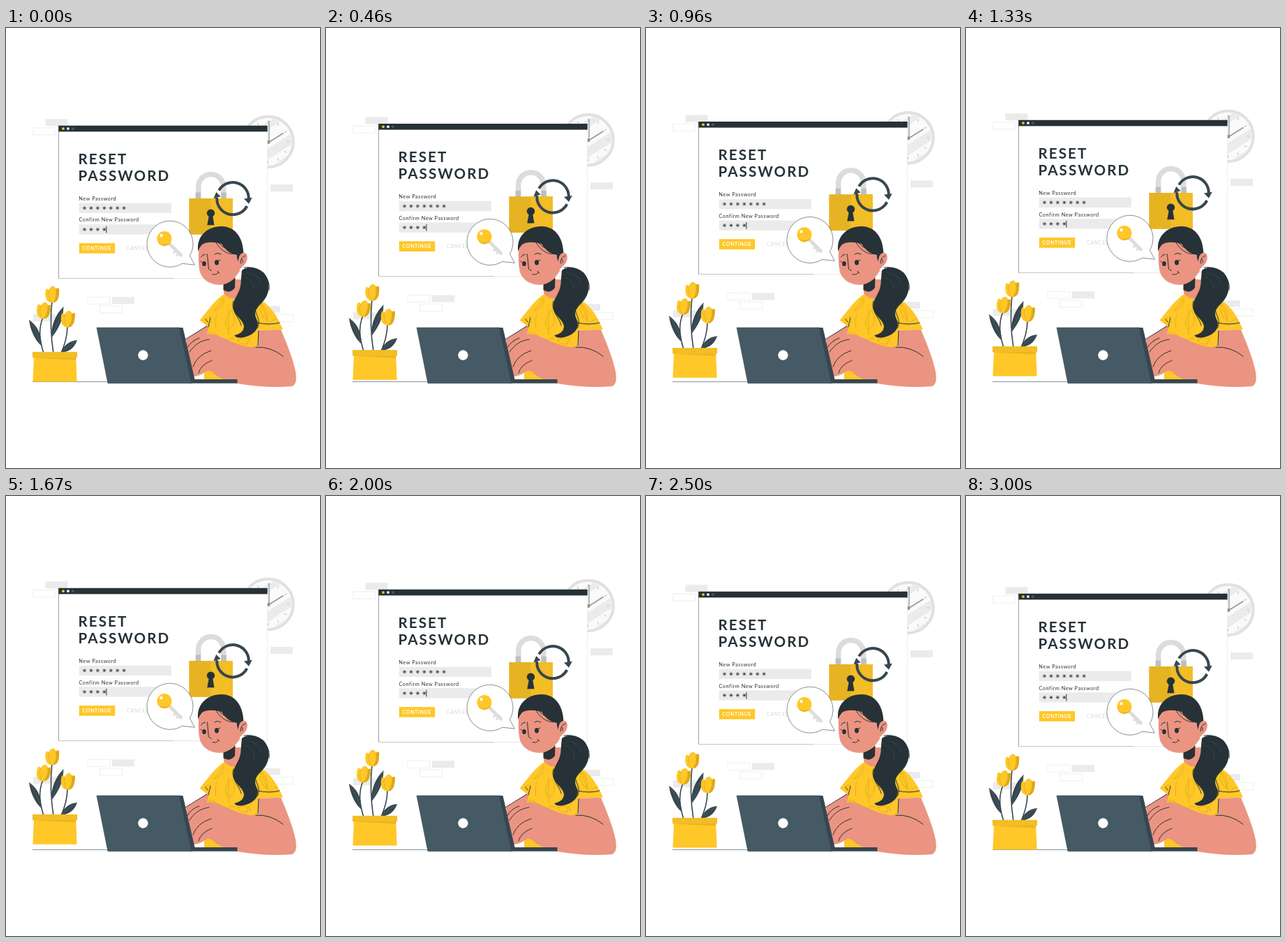
Animation, 450 px wide and 630 px high, one loop 3040 ms. Source, as an HTML page:

```html
<!DOCTYPE html>
<html lang="en">
<head>
<meta charset="utf-8">
<title>Reset password</title>
<style>
html, body { margin: 0; width: 100%; height: 100%; overflow: hidden; background: #fff; }
svg { display: block; width: 450px; height: 630px; }
text { font-family: Lato, "Open Sans", sans-serif; fill: #263238; }
.title { font-size: 20.6px; font-weight: 700; letter-spacing: 2.05px; }
.label { font-size: 7.3px; letter-spacing: .55px; }
.button { font-size: 6.8px; font-weight: 700; letter-spacing: .8px; }
.box { fill: #ebebeb; }
.frame { fill: #fff; stroke: #ebebeb; stroke-width: .8; }
.line { fill: none; stroke: #263238; stroke-width: 1; stroke-linecap: round; stroke-linejoin: round; }
.dark { fill: #263238; }
.slate { fill: #37474f; }
.skin { fill: #eb9481; }
.gold { fill: #ffc727; }
.amber { fill: #e6b323; }
.stem { fill: none; stroke: #37474f; stroke-width: 1.6; }
.print { fill: none; stroke: #d9a61c; stroke-width: .7; }
</style>
</head>
<body>
<svg viewBox="0 0 450 630">
  <defs>
    <path id="star" d="M-2.6 0H2.6M-1.3-2.3 1.3 2.3M1.3-2.3-1.3 2.3" stroke="#263238" stroke-width=".85"/>
    <g id="tulip">
      <path class="gold" d="M-9-7Q-7-9-5-6Q-3-11 1-12Q4-10 5-8Q9-11 10-7C10 4 9 12 0 12C-10 12-11 0-9-7Z"/>
      <path fill="#dda91d" d="M1-12Q5-10 5-7Q10-11 10-6C10 5 8 11 1 12Q7 4 5-6Q4-10 1-12Z"/>
      <path class="print" d="M-5-6Q-7 2-2 10"/>
    </g>
    <clipPath id="face"><circle cx="375.6" cy="163" r="34"/></clipPath>
  </defs>

  <g class="float">
    <rect class="box" x="56.5" y="130.3" width="32" height="10"/>
    <rect class="frame" x="38.5" y="142.9" width="32" height="10"/>
    <rect class="box" x="379" y="224" width="32" height="10"/>
    <rect class="frame" x="117" y="385.2" width="32" height="10"/>
    <rect class="box" x="152" y="385.2" width="32" height="10"/>
    <rect class="frame" x="134.5" y="398" width="32" height="10"/>
    <rect class="box" x="361" y="398" width="32" height="9.5"/>
    <rect class="frame" x="379" y="410.5" width="32" height="10"/>
    <rect class="box" x="39" y="410" width="32" height="10"/>

    <circle cx="375.6" cy="163" r="36.2" fill="#fafafa" stroke="#e0e0e0" stroke-width="4"/>
    <g clip-path="url(#face)" fill="none" stroke="#ebebeb">
      <path d="M336 164 404 122" stroke-width="9"/>
      <path d="M350 197 418 153" stroke-width="13"/>
      <path d="M372 206 420 175" stroke-width="5"/>
    </g>
    <g id="ticks" stroke="#bdbdbd" stroke-width="1"></g>
    <path d="M377 164V133" stroke="#a6a6a6" stroke-width="1.6"/>
    <path d="M376 164 397.5 150.5" stroke="#9b9b9b" stroke-width="1.8"/>
    <circle cx="376" cy="163.5" r="2.5" fill="#919191"/>

    <rect x="75.5" y="140.2" width="299" height="218.1" fill="#fff" stroke="#9a9fa2" stroke-width=".6"/>
    <path d="M374.5 149V358.3H240" fill="none" stroke="#fff" stroke-opacity=".7"/>
    <path d="M75.5 148V358" stroke="#737b80" stroke-width=".5"/>
    <rect class="dark" x="75.2" y="139.8" width="299.4" height="8.6"/>
    <circle class="gold" cx="82" cy="144.1" r="1.9"/>
    <circle cx="89" cy="144.1" r="1.9" fill="#fff"/>
    <circle cx="96" cy="144.1" r="1.9" fill="#455a64"/>

    <text class="title" x="103.5" y="195.2">RESET</text>
    <text class="title" x="103.5" y="219.2">PASSWORD</text>
    <text class="label" x="104.3" y="246.9">New Password</text>
    <rect class="box" x="104.7" y="250.6" width="132.3" height="14.4"/>
    <text class="label" x="104.5" y="277.5">Confirm New Password</text>
    <rect class="box" x="104.7" y="281.2" width="132.3" height="14.4"/>
    <g id="stars"></g>
    <path class="line" d="M143.9 284.2V293" stroke-width=".8"/>
    <rect class="gold" x="104.8" y="308.1" width="51.4" height="14.6"/>
    <text class="button" x="109.5" y="318.1" style="fill:#fff">CONTINUE</text>
    <text class="button" x="173" y="318.1" style="fill:#e0e0e0">CANCEL</text>

    <path d="M275.7 245V227.5a18 18 0 0 1 36 0V245" fill="none" stroke="#dcdcdc" stroke-width="7.5"/>
    <path d="M275.4 235.5V245M312.2 235.5V245" stroke="#bfbfbf" stroke-width="7.5"/>
    <rect class="amber" x="262.3" y="244" width="62.7" height="51.8"/>
    <rect x="293.5" y="244" width="31.5" height="51.8" fill="#f2bd25"/>
    <path class="dark" d="M290.6 270A5.7 5.7 0 1 1 296.4 270L298.5 282.3H288.3Z"/>
    <g fill="none" stroke="#37474f" stroke-width="4">
      <path d="M305.2 232.6A22.8 22.8 0 0 1 347.8 245"/>
      <path d="M345.3 255A22.8 22.8 0 0 1 302.3 243"/>
    </g>
    <path class="slate" d="M341 244.4 352.8 242.7 348 251.8ZM297.4 244.3 307.6 241.2 301.2 235Z"/>

    <path d="M263.4 326A33 33 0 1 0 252.5 337.2L270.3 339.2Z" fill="#fff" stroke="#263238" stroke-width=".55" stroke-linejoin="round"/>
    <g transform="translate(227 301.6) rotate(45)">
      <path fill="#e0e0e0" d="M8-2.6H34L36.5 0 34 2.6H31V5.5H28V2.6H25.5V5.5H22V2.6H8Z"/>
      <path d="M11 .2H34" stroke="#cfcfcf" stroke-width=".8"/>
      <circle class="gold" r="10.6"/>
      <path fill="#edb522" d="M10.3-2A10.5 10.5 0 0 1-2 10.3Q7 8 10.3-2Z"/>
      <circle cx="-6.3" cy="0" r="2.2" fill="#fff"/>
    </g>
  </g>

  <path d="M38 506.5H332" stroke="#455a64" stroke-width=".65"/>

  <g class="float">
    <path class="stem" d="M66 390Q62 428 68 466M53 414C46 432 48 446 54 466M88 427C88 443 83 455 79 466"/>
    <path class="slate" d="M33 418C43 425 51 435 50.5 455C43 448 35 435 33 418ZM82.5 399C82 418 76 430 65 444C64 425 72 409 82.5 399ZM102 447C98 458 91 464 78 465C84 453 91 448 102 447Z"/>
    <path d="M33 418Q44 432 50 454M82 399Q76 422 65 442M102 447Q91 453 79 464" fill="none" stroke="#607078" stroke-width=".5"/>
    <use href="#tulip" x="66.2" y="381.3"/>
    <use href="#tulip" transform="translate(53.8 404.3) rotate(8)"/>
    <use href="#tulip" transform="translate(88.6 416.5) rotate(4)"/>
    <path class="gold" d="M40 471H100.2L101.6 506.6H38.4Z"/>
    <path class="amber" d="M40 472H100.2L100 475 62 473.5Z"/>
    <rect x="38" y="463.8" width="64" height="8.4" fill="#f2bd25"/>
  </g>

  <g>
    <path class="skin" d="M291 424 258 446 262 470 300 450Z"/>
    <path class="line" d="M291 425 256 446.5" stroke-width=".7"/>
    <path class="gold" d="M314 380C301 388 291 402 277.5 418.5L290 428C288 441 284 450 284 462V503H318L362 470 361 433 396.8 431.6C389 413 379 397 364 389C348 381 328 375 314 380Z"/>
    <path class="print" d="M298 405Q307 396 312 387Q315 399 298 405ZM323 405C315 412 312 425 319 432C329 424 330 413 323 405ZM319 402V440M291 435Q304 437 311 450Q295 452 291 435ZM331 447Q342 440 351 449Q340 457 331 447ZM365 394Q377 404 374 419Q362 410 365 394ZM365 392 377 425M379 423Q385 414 389 418M293 412 284 418M302 409Q299 421 301 430M343 457Q350 437 359 434M313 452Q323 440 328 446"/>
    <path class="line" d="M290 428 293 415M360 422Q378 426 392 422" stroke-width=".5"/>
    <path class="line" d="M286 417 289 421" stroke-width=".8"/>

    <path class="skin" d="M312 360H338L334 385Q323 392 312 380Z"/>
    <path class="dark" d="M311.5 366.5Q321 365 328.5 357L328 372Q321 381 311.5 375Z"/>
    <path class="dark" d="M338 347C346 340 360 342 369 350C381 363 378 382 367 393C358 402 354 408 360 419C364 430 355 441 337 443.5Q330 444 327 440Q341 437 341 427C340 417 325 411 325.5 398C326 386 335 381 336.5 366Q337 356 338 347Z"/>
    <path class="line" d="M341 343C361 340 380 356 377 375M357 399C356 409 367 419 360 430M326 391C321 405 336 416 337 426" stroke-width=".7"/>
    <path d="M345 350Q362 352 366 367M342 357Q356 360 356 376" fill="none" stroke="#46545b" stroke-width=".5"/>

    <path class="skin" d="M277 309C275 326 275.5 342 278.5 351C283 363 298 369.5 311 367.5C325 364 334 351 338 342L337 311Q306 291 277 309Z"/>
    <path class="dark" d="M275.5 320C272 300 287 284 309 284C326 284 340 297 340.5 324Q334 325 335 337Q330 331 331 325C320 323 313 316 309 309Q291 304 281 310Q277 314 275.5 320Z"/>
    <path class="line" d="M301 307C307 318 318 326 332 323M303 306Q318 322 333 320" stroke-width=".7"/>
    <path class="skin" d="M333 334C333 323 341 319 345 324C348 331 343 341 335 344Z"/>
    <path class="line" d="M336 337Q336 328 343 326M338 331Q340 333 339 336" stroke-width=".7"/>
    <circle cx="336.5" cy="345.5" r="1.5" fill="#fff"/>
    <path class="line" d="M279.5 328Q281 324.5 285.5 324M299 324Q303 321 308 324" stroke-width="2.2"/>
    <path class="line" d="M288.5 324 290.4 345 294.3 347.5" stroke-width="1.4"/>
    <ellipse class="dark" cx="284" cy="337.5" rx="2.8" ry="3.6"/>
    <ellipse class="dark" cx="302" cy="335.8" rx="3" ry="3.7"/>
    <path class="line" d="M281 336 279 334M304 333.5 307 332M296 352.5Q301 354.5 304.5 350M303 348.5Q305.5 349 305.5 351"/>

    <path class="skin" d="M257 454C259 447 269 444 277 442C289 436 299 438 307 442C321 448 335 455 350 457L362 456 361 433 394 431.8C401 449 411 472 415 492Q418 510 410 513Q374 516 335 509.5C319 507 306 501 299 496Q294 490 288 491C282 495 276 499 268 499L263 497Z"/>
    <path class="line" d="M259 459Q266 447 277 444M263 464C271 452 281 447 291 446M268 485Q274 468 294 462M276 494Q279 482 295 476M358 457Q380 456 397 470" stroke-width=".9"/>
    <path class="line" d="M362 434 361 455" stroke-width=".4"/>
  </g>

  <path class="slate" d="M247 429H253.5L270.5 503H331.5V508.7H262Z"/>
  <path d="M130 429H248.5L266 508.7H146Z" fill="#455a64" stroke="#34434a" stroke-width=".6"/>
  <circle cx="196.4" cy="468.5" r="7.2" fill="#fff"/>
</svg>
<script>
const LOOP = 3040, HALF = 1500, LIFT = 9;

const range = n => [...Array(n).keys()];
const starRow = (count, y) =>
  range(count).map(i => `<use href="#star" x="${112.5 + i * 9.45}" y="${y}"/>`).join('');
document.getElementById('stars').innerHTML = starRow(7, 257.8) + starRow(4, 288.4);
document.getElementById('ticks').innerHTML = range(12)
  .map(i => `<path d="M375.6 132.5V136" transform="rotate(${i * 30} 375.6 163)"/>`).join('');

const floating = document.querySelectorAll('.float');

// Linear rise and fall, with a short rest at the end of the loop.
function draw(now) {
  const t = now % LOOP;
  const y = -LIFT * Math.max(0, 1 - Math.abs(t - HALF) / HALF);
  floating.forEach(g => g.setAttribute('transform', `translate(0 ${y.toFixed(3)})`));
}

const start = performance.now();
function tick() {
  draw(performance.now() - start);
  requestAnimationFrame(tick);
}
tick();
</script>
</body>
</html>
```
